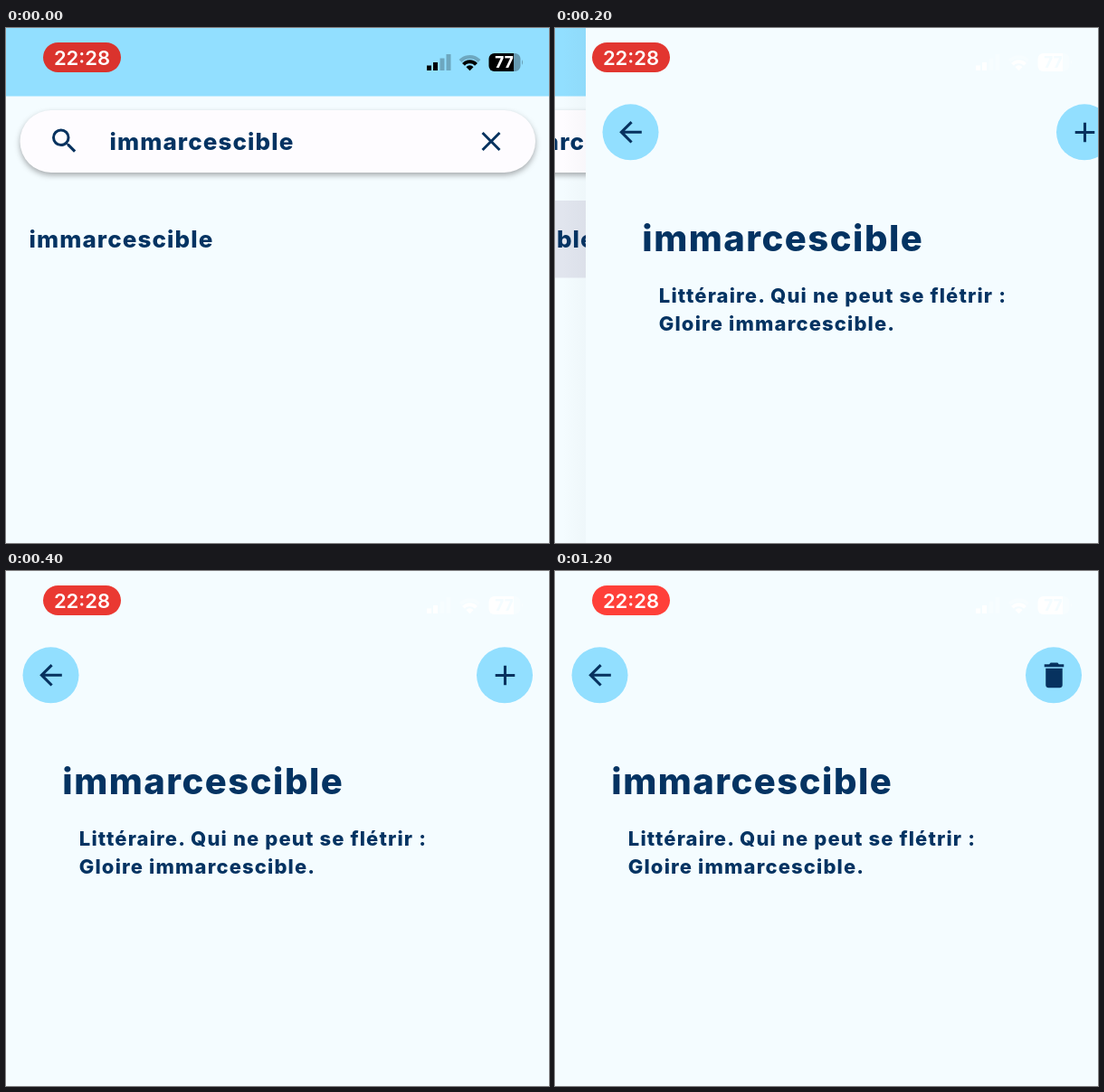
Animation, 600 px wide and 570 px high, one loop 1.25 s. Source, as an HTML page:

```html
<!DOCTYPE html>
<html lang="fr">
<head>
<meta charset="utf-8">
<style>
  html, body { margin: 0; width: 100%; height: 100%; overflow: hidden; background: #f4fcff; }
  svg { display: block; width: 600px; height: 570px; }
  text { font-family: Inter, "Open Sans", sans-serif; font-weight: 800; fill: #043362; }
  .icon { fill: #07325f; }
  .word { font-size: 26px; letter-spacing: .043em; }
  .title { font-size: 40px; letter-spacing: .0375em; }
  .body { font-size: 22px; letter-spacing: .052em; }
  .bar { fill: #fefcff; filter: drop-shadow(0 3px 3px rgba(0, 0, 0, .32)); }
  #clock { font-size: 22px; font-weight: 600; fill: #fff; }
  #level { font-size: 17px; }
</style>
</head>
<body>
<svg viewBox="0 0 600 570">
  <defs>
    <linearGradient id="edge">
      <stop offset="0" stop-color="#345" stop-opacity="0"/>
      <stop offset="1" stop-color="#345" stop-opacity=".03"/>
    </linearGradient>
    <clipPath id="row"><rect y="191" width="600" height="85.5"/></clipPath>
  </defs>

  <g id="search">
    <rect width="600" height="570" fill="#f4fcff"/>
    <rect width="600" height="75.5" fill="#92dfff"/>
    <rect class="bar" x="15.5" y="91" width="569.5" height="69" rx="34.5"/>
    <path class="icon" transform="translate(46.5 107) scale(1.5)" d="M15.5 14h-.79l-.28-.27A6.47 6.47 0 0 0 16 9.5 6.5 6.5 0 1 0 9.5 16c1.61 0 3.09-.59 4.23-1.57l.27.28v.79l5 4.99L20.49 19zM9.5 14a4.5 4.5 0 1 1 0-9 4.5 4.5 0 0 1 0 9z"/>
    <path class="icon" transform="translate(518 107.5) scale(1.5)" d="M19 6.41 17.59 5 12 10.59 6.41 5 5 6.41 10.59 12 5 17.59 6.41 19 12 13.41 17.59 19 19 17.59 13.41 12z"/>
    <g clip-path="url(#row)"><circle id="ripple" cx="268" cy="234" fill="#204"/></g>
    <text class="word" x="114.5" y="135">immarcescible</text>
    <text class="word" x="25.5" y="243">immarcescible</text>
  </g>

  <g id="detail">
    <rect id="shade" x="-26" width="26" height="570" fill="url(#edge)"/>
    <rect width="600" height="570" fill="#f4fcff"/>
    <g fill="#92dfff">
      <circle cx="49.5" cy="115.3" r="31"/>
      <circle cx="551" cy="115.3" r="31"/>
    </g>
    <path class="icon" transform="translate(31 96.8) scale(1.54)" d="M20 11H7.83l5.59-5.59L12 4l-8 8 8 8 1.41-1.41L7.83 13H20z"/>
    <path class="icon" id="action" transform="translate(533 97) scale(1.54)"/>
    <text class="title" x="62.3" y="246.5">immarcescible</text>
    <text class="body" x="80.8" y="304">Littéraire. Qui ne peut se flétrir :</text>
    <text class="body" x="80.8" y="335">Gloire immarcescible.</text>
  </g>

  <rect id="pill" x="41" y="16" width="86" height="33" rx="16.5"/>
  <text id="clock" x="84" y="41" text-anchor="middle">22:28</text>

  <g id="status">
    <path d="M465 41.5h5v5.5h-5zM472 38h5v9h-5z"/>
    <path d="M479.5 33.5h5v13.5h-5zM486.5 29h5v18h-5z" opacity=".25"/>
    <g fill="none" stroke-width="4">
      <path d="M502 36.5a14.5 14.5 0 0 1 21 0" opacity=".25"/>
      <path d="M505.5 40.3a9.5 9.5 0 0 1 14 0"/>
    </g>
    <path d="M508.5 43.2a5 5 0 0 1 8 0l-4 4z"/>
    <path d="M539.5 28H561v20h-21.5a6 6 0 0 1-6-6v-8a6 6 0 0 1 6-6z"/>
    <path d="M561 28h1.5a6 6 0 0 1 6 6v8a6 6 0 0 1-6 6H561zM570 35q2 3 0 6z" opacity=".3"/>
    <text id="level" x="550.5" y="44" text-anchor="middle">77</text>
  </g>
</svg>
<script>
const $ = id => document.getElementById(id);
const set = (id, attrs) => {
  for (const name in attrs) $(id).setAttribute(name, attrs[name]);
};
const clamp = v => Math.min(1, Math.max(0, v));
const mix = (a, b, p) => a + (b - a) * p;

const LOOP = 1250, STEP = 50, WIDTH = 600;
const PLUS = "M19 13h-6v6h-2v-6H5v-2h6V5h2v6h6z";
const TRASH = "M6 19c0 1.1.9 2 2 2h8c1.1 0 2-.9 2-2V7H6zM19 4h-3.5l-1-1h-5l-1 1H5v2h14z";

// Critically damped slide whose phase eases off towards the end
function slide(t) {
  if (t >= 400) return 0;
  const u = (t - 100) / 100;
  const k = Math.max(0, 1.535 + 3.3275 * u - .2725 * u * u);
  return Math.floor(WIDTH * (1 + k) * Math.exp(-k) + .2);
}

function draw(t) {
  const x = slide(t), light = t >= 150;
  // The page below moves a third as far, with a slight lag
  set("search", { transform: `translate(${-Math.max(0, (WIDTH - x) / 3 - 4)})` });
  set("detail", { transform: `translate(${x})` });
  set("shade", { opacity: 1 - x / WIDTH });
  set("ripple", { r: Math.max(0, (t - 40) * 2.6), opacity: .09 * clamp(t / 180) });
  set("action", { d: t < 1150 ? PLUS : TRASH });

  const glow = clamp(t / 900);
  set("pill", { fill: `rgb(${mix(218, 255, glow)},${mix(51, 64, glow)},${mix(45, 57, glow)})` });
  const ink = light ? "#fff" : "#000";
  set("status", { fill: ink });
  $("status").querySelector("g").setAttribute("stroke", ink);
  $("level").style.fill = light ? "#f4fcff" : "#fff";
}

function tick(now) {
  draw(Math.floor(now % LOOP / STEP) * STEP);
  requestAnimationFrame(tick);
}
draw(0);
requestAnimationFrame(tick);
</script>
</body>
</html>
```
